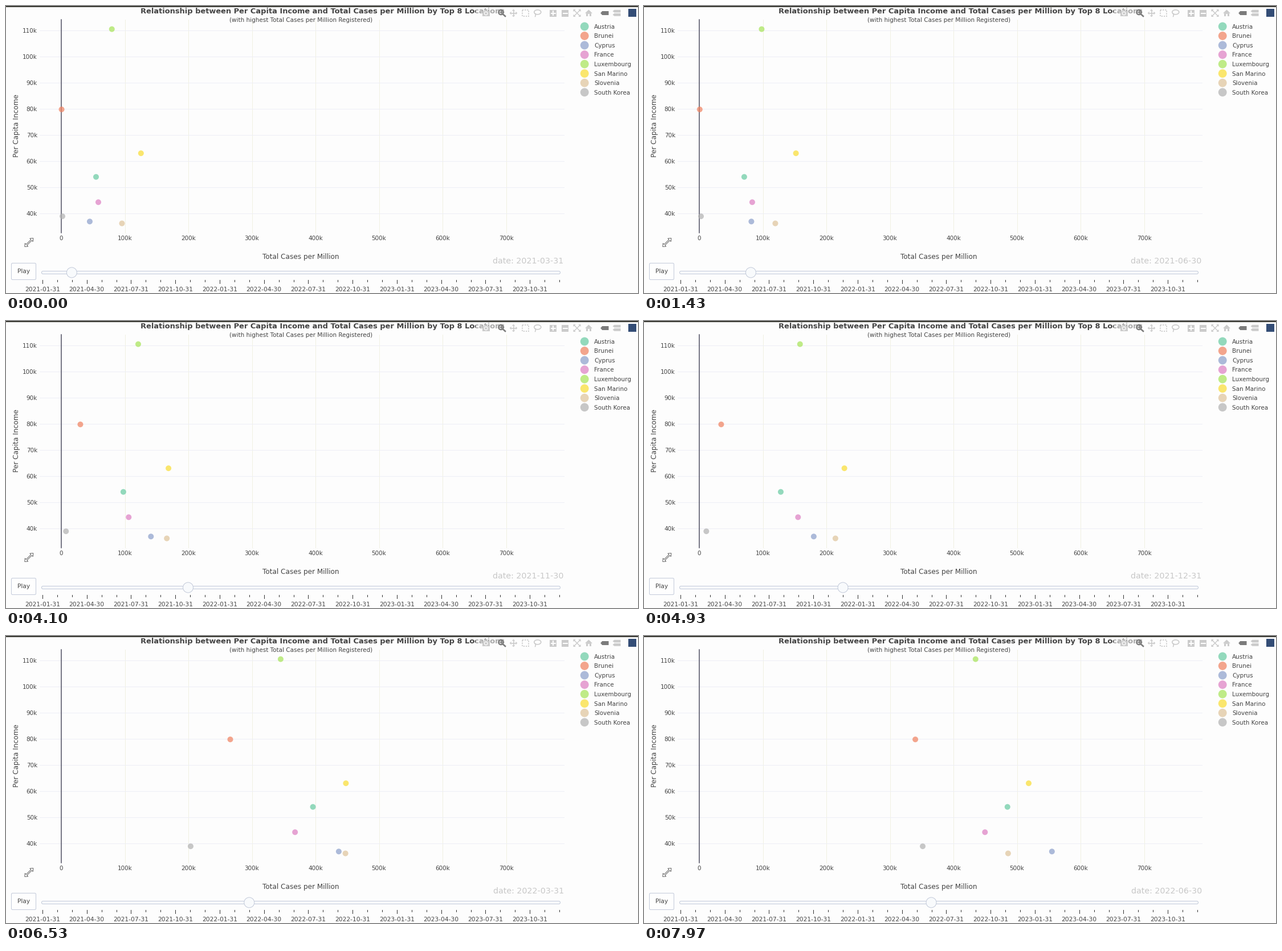
These frames come from a looping animation (1109 by 505 pixels, 8000 ms). A matplotlib script:

```python
import numpy as np
import matplotlib.pyplot as plt
from matplotlib.animation import FuncAnimation
from matplotlib.patches import Circle, Ellipse, FancyBboxPatch, Polygon, Rectangle

W, H, DPI = 1109, 505, 100
LOOP, FRAMES = 8000, 250
STEP = LOOP / FRAMES
PX = 72 / DPI

INK, PALE, DARK = "#444444", "#cbcbcb", "#7b7b7b"
PAPER, RAIL, EDGE = "#fdfdfd", "#f8fafc", "#c3cada"

# name: (colour, income in thousands, thousands of cases per million at key stages)
SERIES = {
    "Austria": ("#6bcca4", 53.95, (54.7, 71, 75.8, 97.6, 211, 395.5, 485)),
    "Brunei": ("#f08362", 79.8, (.5, .7, 6, 30, 46.6, 265.5, 340)),
    "Cyprus": ("#8da0cb", 36.86, (44.8, 82.5, 128, 141, 286, 436, 555)),
    "France": ("#de80c4", 44.26, (58.3, 83.7, 99, 106, 289, 367.4, 449.6)),
    "Luxembourg": ("#a8e45a", 110.54, (79.6, 98.4, 108, 121, 260, 344.7, 434.8)),
    "San Marino": ("#f9de36", 63, (125.4, 152.5, 159.6, 168.6, 390, 447.5, 518.4)),
    "Slovenia": ("#dfc59c", 36.14, (95.5, 120, 126.5, 166, 344.7, 447, 486)),
    "South Korea": ("#b3b3b3", 38.86, (1.8, 2.7, 4.9, 7.4, 21, 202.7, 351.6)),
}

# Shared wave: month -> stage
WAVE = np.array([(1.5, 0), (3, .72), (4.26, 1), (6, 1.4), (7.02, 2), (9.26, 3),
                 (10, 3.1), (11, 3.27), (12.1, 4), (13, 4.5), (13.73, 5),
                 (14, 5.25), (15, 5.68), (16.5, 6)]).T

# Time at which the move to each month begins
MONTHS = np.arange(2, 18)
STARTS = np.interp(MONTHS, [2, 5, 8, 10, 13, 14, 17],
                   [-250, 1225, 2838, 3894, 5525, 6230, 7718])

plt.rcParams["font.family"] = "DejaVu Sans"
fig = plt.figure(figsize=(W / DPI, H / DPI), dpi=DPI, facecolor=PAPER)
ax = fig.add_axes([0, 0, 1, 1])
ax.set(xlim=(0, W), ylim=(H, 0))
ax.axis("off")


def cases_x(k):
    return 97 + 1.115 * k


def income_y(k):
    return 43.2 + 4.594 * (110 - k)


def slider_x(month):
    return 64 + 25.914 * month


def month_end(m):
    return str((np.datetime64("2021-02") + m).astype("M8[D]") - 1)


def label(x, yc, s, size=10.4, ha="center", color=INK, **kw):
    return ax.text(x, yc + .365 * size, s, fontsize=size * PX, ha=ha,
                   va="baseline", color=color, **kw)


def line(xs, ys, color, width=1, **kw):
    ax.plot(xs, ys, color=color, lw=width * PX, **kw)


def add(patch, z=2):
    patch.set_zorder(z)
    return ax.add_patch(patch)


def box(x0, y0, x1, y1, color, z=6, **kw):
    add(Rectangle((x0, y0), x1 - x0, y1 - y0, fc=color, ec="none", **kw), z)


def rounded(x0, y0, x1, y1, r, face):
    add(FancyBboxPatch((x0 + r, y0 + r), x1 - x0 - 2 * r, y1 - y0 - 2 * r,
                       boxstyle=f"round,pad={r}", fc=face, ec=EDGE, lw=PX))


def poly(points, color):
    add(Polygon(points, fc=color, ec="none"), 6)


def draw_plot():
    box(0, 0, W, 1.6, "#3a3a34", 7)
    for k in range(0, 800, 100):
        x = cases_x(k)
        if k:
            line([x, x], [24, 399], "#f0f0e2", zorder=1)
        label(x, 408, f"{k}k" if k else "0")
    for k in range(40, 120, 10):
        y = income_y(k)
        line([59, 979], [y, y], "#edeef6", zorder=1)
        label(55, y, f"{k}k", ha="right")
    line([97, 97], [24, 399], "#4b4b5e", 1.5, zorder=1.5)
    label(556, 8, "Relationship between Per Capita Income and Total Cases "
          "per Million by Top 8 Locations", 13.05, weight="bold")
    label(518, 24.2, "(with highest Total Cases per Million Registered)")
    label(517.5, 440.5, "Total Cases per Million", 12.05)
    ax.text(22.3, 211, "Per Capita Income", fontsize=12.15 * PX, rotation=90,
            ha="center", va="baseline", rotation_mode="anchor", color=INK)


def draw_legend():
    for i, (name, (color, *_)) in enumerate(SERIES.items()):
        y = 36 + 16.55 * i
        add(Circle((1015.2, y), 7.4, fc=color, ec="none", alpha=.72))
        label(1032.2, y, name, ha="left")


def draw_controls():
    rounded(9.5, 452.5, 52.5, 481.5, 2, "#fefefe")
    label(31, 466.5, "Play", 10.5)
    rounded(62.5, 466.5, 972.5, 471.5, 2.4, RAIL)
    for m in range(36):
        x = slider_x(m)
        major = m % 3 == 0
        line([x, x], [482, 488 if major else 485], "#333333")
        if major:
            label(x, 498, month_end(m), 10.6)
    # Double-headed resize arrow
    half = np.array([(7.5, -7.5), (7, -1.5), (5, -3.5), (-3.5, 5), (-1.5, 7)])
    add(Polygon(np.vstack([half, -half]) + (40.3, 416),
                fc=PAPER, ec="#666666", lw=PX))


def tag(x0, x1, y0, y1, color):
    poly([(x0, (y0 + y1) / 2), (x0 + 3, y0), (x1, y0), (x1, y1), (x0 + 3, y1)], color)


def draw_toolbar():
    box(823.5, 2, W, 22, PAPER, 5, alpha=.55)
    # camera
    box(835.5, 8.5, 849, 17.8, PALE)
    box(839.5, 6.8, 845, 9, PALE)
    add(Circle((842.2, 13), 2.8, fc=PALE, ec=PAPER, lw=1.3 * PX), 6)
    # zoom
    add(Circle((868.5, 11), 4.2, fc="none", ec=DARK, lw=2.2 * PX), 6)
    line([866.5, 870.5], [11, 11], DARK, 1.5, zorder=6)
    line([868.5, 868.5], [9, 13], DARK, 1.5, zorder=6)
    line([871.8, 876], [14.2, 18], DARK, 2.6, zorder=6)
    # pan
    c = np.array([890.5, 12.5])
    for d in np.array([(1, 0), (-1, 0), (0, 1), (0, -1)]):
        side, base = d[::-1] * 2.8, c + 4 * d
        line(*zip(c, base), PALE, 1.6, zorder=6)
        poly([c + 6.8 * d, base + side, base - side], PALE)
    # box select and lasso
    add(Rectangle((905.8, 6.8), 11.6, 11.6, fc="none", ec=PALE, lw=1.8 * PX,
                  ls=(0, (1.2, 1.1))), 6)
    add(Ellipse((932.8, 10.8), 12, 8, fc="none", ec=PALE, lw=1.6 * PX), 6)
    line([928.5, 929.5, 928.6], [13.5, 15.5, 18.5], PALE, 1.6, zorder=6)
    # zoom in and out
    for x in (960, 981):
        box(x - 6, 6.5, x + 6, 18.5, PALE)
        line([x - 3.5, x + 3.5], [12.5, 12.5], PAPER, 2, zorder=6.1)
    line([960, 960], [9, 16], PAPER, 2, zorder=6.1)
    # autoscale
    for sx in (-1, 1):
        line([1002 - 5 * sx, 1002 + 5 * sx], [7.5, 17.5], PALE, 1.4, zorder=6)
        for sy in (-1, 1):
            x, y = 1002 + 6.5 * sx, 12.5 + 6.5 * sy
            poly([(x, y), (x - 4.2 * sx, y), (x, y - 4.2 * sy)], PALE)
    # home
    poly([(1022.5, 6.5), (1029, 12.8), (1016, 12.8)], PALE)
    box(1018, 12.5, 1027, 18, PALE)
    box(1021.4, 14.2, 1023.6, 18, PAPER, 6.1)
    # hover modes and badge
    tag(1043.2, 1057.5, 9, 16, DARK)
    tag(1064.5, 1078.5, 6.8, 11.5, PALE)
    tag(1064.5, 1078.5, 13, 17.7, PALE)
    box(1092, 5, 1106, 19, "#344d76")


def cubic(u):
    u = min(max(u, 0), 1)
    return 4 * u ** 3 if u < .5 else 1 - 4 * (1 - u) ** 3


draw_plot()
draw_legend()
draw_controls()
draw_toolbar()
dots = [add(Circle((0, 0), 5, fc=color, ec="none", alpha=.72), 3)
        for color, *_ in SERIES.values()]
grip = add(Circle((0, 469), 9, fc=RAIL, ec=EDGE, lw=PX), 4)
date = label(978.8, 447.5, "", 14.3, ha="right", color="#c8c8c8")


def update(i):
    t = i * STEP
    n = np.searchsorted(STARTS, t, side="right") - 1
    month, since = int(MONTHS[n]), t - STARTS[n]
    stage = np.interp(month - 1 + cubic(since / 500), *WAVE)
    for dot, (_, income, cases) in zip(dots, SERIES.values()):
        k = np.interp(stage, range(len(cases)), cases)
        dot.set_center((cases_x(k), income_y(income)))
    grip.set_center((slider_x(month - 1 + cubic(since / 300)), 469))
    date.set_text("date: " + month_end(month))
    return dots + [grip, date]


anim = FuncAnimation(fig, update, frames=FRAMES, interval=STEP,
                     repeat=True, repeat_delay=0, blit=False)
plt.show()
```
